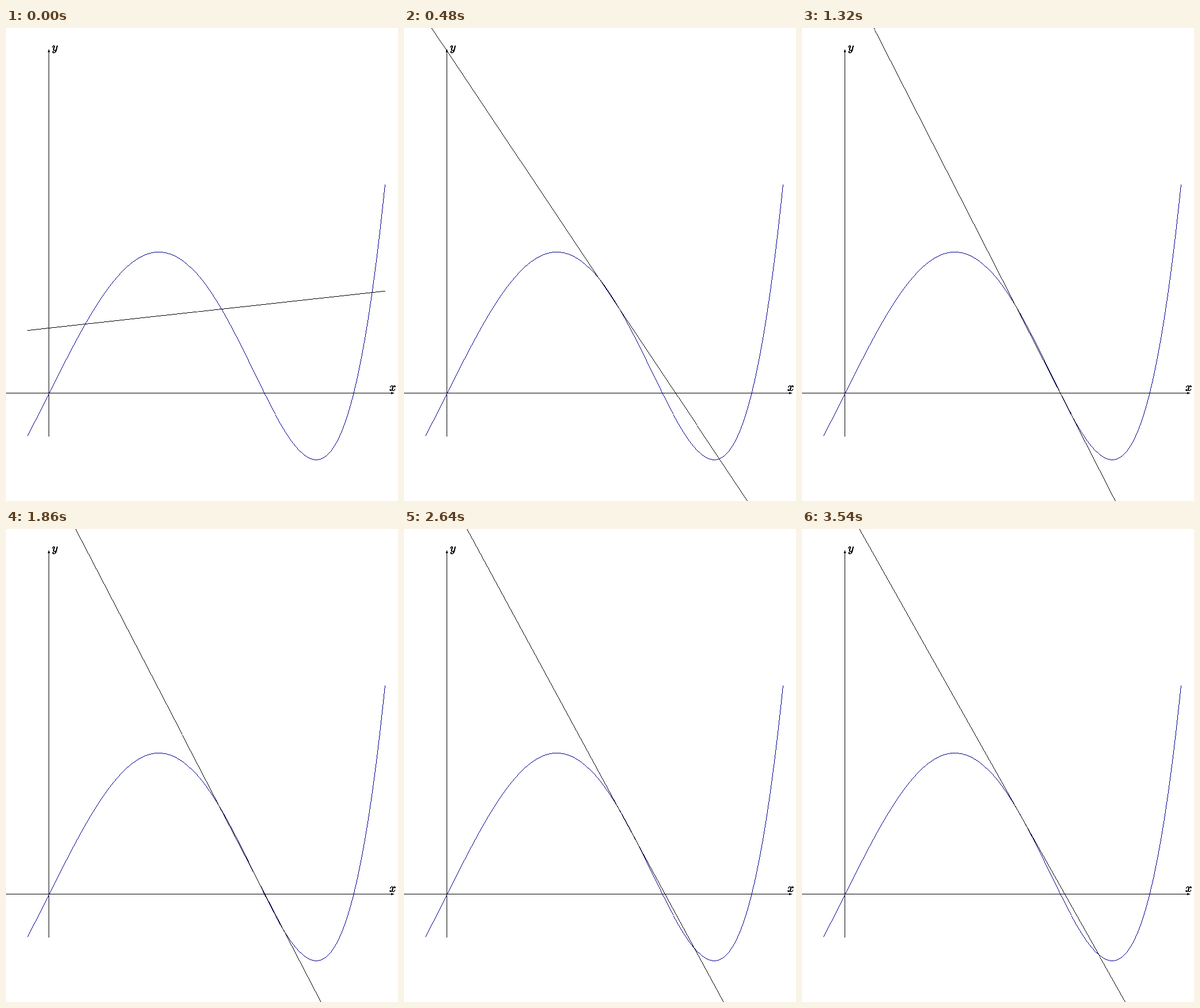
Recreate the animation shown at these times as a matplotlib script. Size 681 by 822 pixels, loop 3600 ms.

```python
import numpy as np
import matplotlib.pyplot as plt
from matplotlib.animation import FuncAnimation
from matplotlib.collections import PolyCollection
from matplotlib.patheffects import withStroke

W, H, DPI = 681, 822, 64
PT = 72 / DPI                   # points per pixel
UNIT, OX, OY = 374, 75, 635
LEFT, RIGHT = -0.1, 1.56
FIXED, GAP, SHRINK = 0.8, 0.7, 0.95
FRAMES, STEP = 60, 60
INK, NAVY = "#000000", "#00008b"
CORNERS = np.array([[0, 0], [1, 0], [1, 1], [0, 1]])

plt.rcParams["mathtext.fontset"] = "cm"


def f(x):
    return x**5 - 3 * x**3 + 2 * x


def to_px(x, y):
    return OX + UNIT * np.asarray(x), OY - UNIT * np.asarray(y)


def pixels(x, y):
    """Unit squares of a one-pixel-wide line without smoothing."""
    steps = np.maximum(np.abs(np.diff(x)), np.abs(np.diff(y)))
    length = np.concatenate([[0], np.cumsum(steps)])
    s = np.linspace(0, length[-1], int(length[-1]) + 1)
    cells = np.floor(np.column_stack([np.interp(s, length, x),
                                      np.interp(s, length, y)]))
    return cells[:, None] + CORNERS


fig = plt.figure(figsize=(W / DPI, H / DPI), dpi=DPI, facecolor="white")
ax = fig.add_axes([0, 0, 1, 1])
ax.set_xlim(0, W)
ax.set_ylim(H, 0)
ax.axis("off")


def stroke(x, y, color):
    line = PolyCollection(pixels(x, y), facecolors=color,
                          edgecolors="none", linewidths=0)
    ax.add_collection(line, autolim=False)
    return line


def label(x, y, name):
    ax.text(x, y, f"${name}$", fontsize=20 * PT, color=INK,
            ha="center", va="center",
            path_effects=[withStroke(linewidth=0.6, foreground=INK)])


# Axes with small arrowheads
row, col = OY - 0.5, OX - 0.5
stroke([0.5, 672.5], [row, row], INK)
stroke([col, col], [709.5, 39.5], INK)
ax.fill([675, 669, 669], [row, row - 2, row + 2], color=INK, lw=0)
ax.fill([col, col - 2, col + 2], [36.5, 42, 42], color=INK, lw=0)
label(85.7, 36, "y")
label(672.3, 625, "x")

u = np.linspace(LEFT, RIGHT, 400)
stroke(*to_px(u, f(u)), NAVY)
ends = np.array([LEFT, RIGHT])
secant = stroke(*to_px(ends, 0 * ends), INK)


def draw(i):
    # The second point closes in on the fixed one geometrically
    moving = FIXED + GAP * SHRINK**i
    slope = (f(moving) - f(FIXED)) / (moving - FIXED)
    secant.set_verts(pixels(*to_px(ends, f(FIXED) + slope * (ends - FIXED))))
    return [secant]


anim = FuncAnimation(fig, draw, frames=FRAMES, interval=STEP,
                     repeat=True, repeat_delay=0, blit=False)
plt.show()
```
